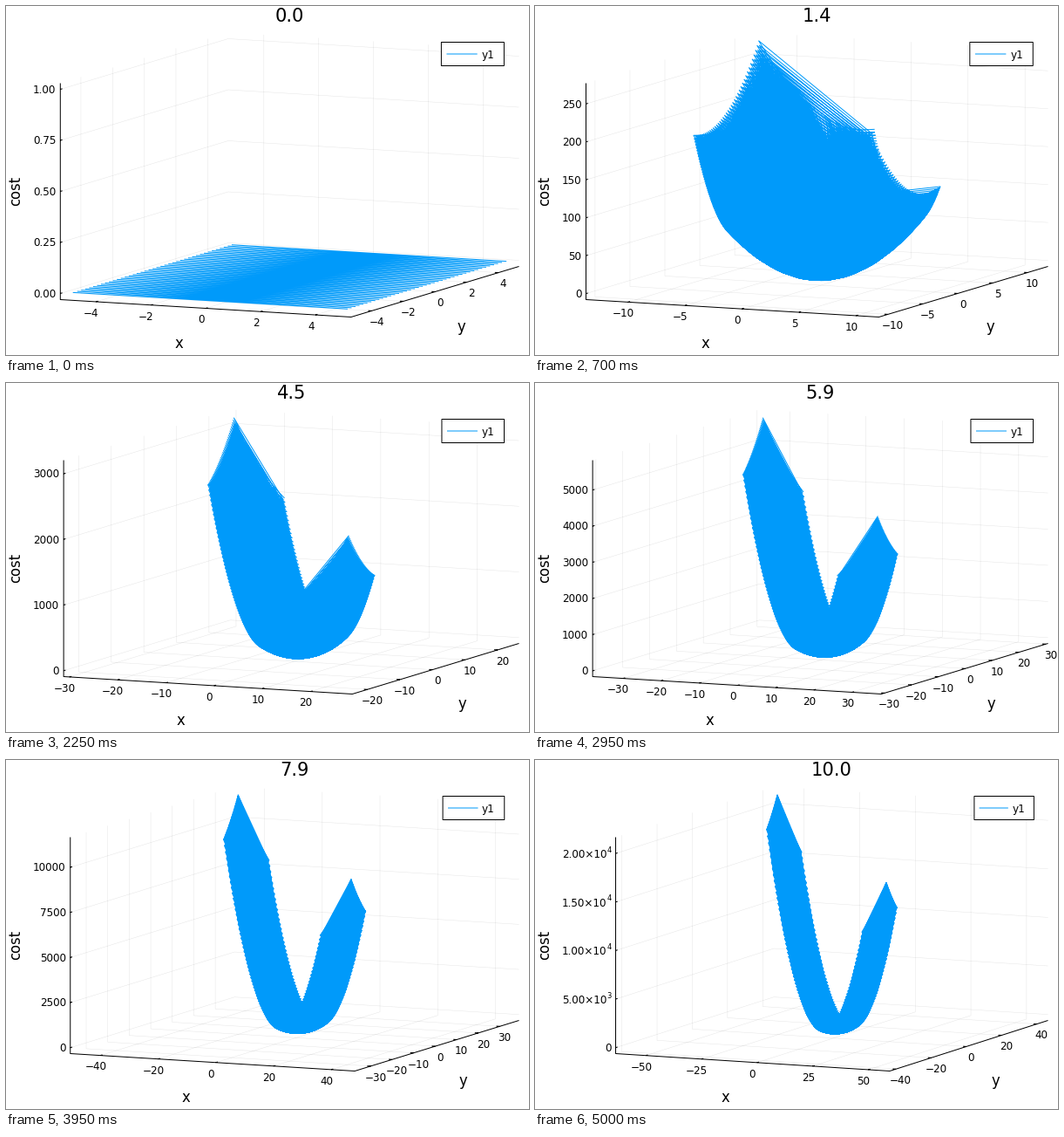
A matplotlib script that plays this animation: 600 px wide and 400 px high, repeating every 5.05 s.

```python
import math

import matplotlib as mpl
import matplotlib.pyplot as plt
import numpy as np
from matplotlib.animation import FuncAnimation

mpl.rcParams["font.family"] = "DejaVu Sans"
mpl.rcParams["agg.path.chunksize"] = 5000

PX = 0.72                     # points per pixel at 100 dpi
BLUE = "#009AFA"
RIGHT, BASE = 588.5, 336.5    # right end and left-corner height of the axes box
FRAMES, DT, SUB = 101, 0.1, 20
A, B = 0.01, -0.05            # growth rates of x and y

fig = plt.figure(figsize=(6, 4), dpi=100, facecolor="white")
ax = fig.add_axes([0, 0, 1, 1])


# Dynamics: x' = A x - w, y' = B y + w, w = u + sin t,
# cost = integral of x^2 + y^2 + w^2.

def basis(rate, sign, t):
    """Coefficients of (start value, u, 1) in the state at time t."""
    e = np.exp(rate * t)
    forced = (e - np.cos(t) - rate * np.sin(t)) / (1 + rate ** 2)
    return np.array([e, sign * (e - 1) / rate, sign * forced])


def gram(v, dt):
    """Running integral of the outer product v v^T."""
    p = v[:, None] * v[None]
    g = np.zeros_like(p)
    g[..., 1:] = np.cumsum((p[..., 1:] + p[..., :-1]) * dt / 2, axis=-1)
    return g


time = np.arange((FRAMES - 1) * SUB + 1) * DT / SUB
VX, VY = basis(A, -1, time), basis(B, 1, time)
VW = np.array([0 * time, 1 + 0 * time, np.sin(time)])
GX, GY, GW = (gram(v, DT / SUB) for v in (VX, VY, VW))

U = np.linspace(-5, 5, 101)[:, None, None]
Y0 = np.linspace(-5, 5, 41)[None, :, None]
X0 = np.linspace(-5, 5, 9)[None, None, :]


def quad(g, a, u):
    return (g[0, 0] * a * a + g[1, 1] * u * u + g[2, 2]
            + 2 * (g[0, 1] * a * u + g[0, 2] * a + g[1, 2] * u))


def states(i):
    k = i * SUB
    u = U if i else U[:1]     # all sheets coincide at the start
    x = VX[0, k] * X0 + VX[1, k] * u + VX[2, k]
    y = VY[0, k] * Y0 + VY[1, k] * u + VY[2, k]
    z = (quad(GX[..., k], X0, u) + quad(GY[..., k], Y0, u)
         + quad(GW[..., k], 0, u))
    return np.broadcast_arrays(x, y, z)


# Axis limits, ticks and labels

def limits(v):
    lo, hi = float(v.min()), float(v.max())
    if hi - lo < 1e-12:
        hi = lo + 1
    pad = 0.03 * (hi - lo)
    return lo - pad, hi + pad


def nice_ticks(lo, hi):
    span = hi - lo
    top = math.ceil(math.log10(span))
    best, ticks = -1, []
    for z in (top, top - 1, top - 2):
        for q, nice in ((5, .9), (3, .2), (2.5, .5), (2, .7), (1, 1)):
            step = q * 10.0 ** z
            first, last = math.ceil(lo / step - 1e-9), math.floor(hi / step + 1e-9)
            n = last - first + 1
            if not 4 <= n <= 8:
                continue
            score = ((1 - abs(n - 5) / 5) / 4 + nice / 4
                     + 0.5 * span / ((n - 1) * step))
            if score > best + 1e-9:
                best = score
                ticks = [j * step for j in range(first, last + 1)]
    return ticks


def decimals(values):
    d = 0
    while d < 6 and any(abs(round(v, d) - v) > 1e-7 for v in values):
        d += 1
    return d


def labels(ticks):
    """Pairs of label text and exponent."""
    if ticks[-1] - ticks[0] > 10000.5:
        exps = [math.floor(math.log10(abs(v)) + 1e-9) if v else 0 for v in ticks]
        mant = [v / 10 ** e for v, e in zip(ticks, exps)]
        d = decimals(mant) + 1
        return [(f"{m:.{d}f}×10", str(e)) if m else ("0", "")
                for m, e in zip(mant, exps)]
    d = decimals(ticks)
    return [(f"{v + 0.0:.{d}f}".replace("-", "−"), "") for v in ticks]


EXP = 4.9                     # width of an exponent digit


def width(label):
    em = {".": .318, "×": .838, "−": .838}
    body, exp = label
    return 12 * sum(em.get(c, .636) for c in body) + EXP * len(exp)


# Drawing helpers

def text(x, y, s, size=12, ha="center"):
    ax.text(x, y + 0.365 * size, s, fontsize=size * PX, ha=ha, va="baseline")


def strokes(paths, color="black", lw=1.0, alpha=1.0):
    xs, ys = [], []
    for path in paths:
        for x, y in path:
            xs.append(x)
            ys.append(y)
        xs.append(np.nan)
        ys.append(np.nan)
    ax.plot(xs, ys, color=color, lw=lw * PX, alpha=alpha, solid_capstyle="butt")


def legend(w):
    right = RIGHT - 0.0325 * w
    left = right - 10.6 - 0.1167 * w
    ax.add_patch(plt.Rectangle((left, 41.5), right - left, 27, fc="white",
                               ec="black", lw=PX, zorder=4, snap=False))
    ax.plot([left + 0.0125 * w, left + 0.0775 * w], [55, 55],
            color=BLUE, lw=PX, zorder=5, snap=False)
    ax.text(left + 0.0875 * w, 59.8, "y1", fontsize=12 * PX, zorder=5)


def draw(i):
    ax.clear()
    ax.set_xlim(0, 600)
    ax.set_ylim(400, 0)
    ax.axis("off")

    x, y, z = states(i)
    lims = [limits(v) for v in (x, y, z)]
    ticks = [nice_ticks(*lim) for lim in lims]
    names = [labels(t) for t in ticks]
    left = 35.6 + max(width(n) for n in names[2])
    w = RIGHT - left

    def project(fx, fy, fz):
        return (left + w * (0.634 * fx + 0.366 * fy),
                BASE + 20 * fx - 58 * fy - 248 * fz)

    def frac(v, axis):
        lo, hi = lims[axis]
        return (v - lo) / (hi - lo)

    fx, fy, fz = ([frac(v, k) for v in ticks[k]] for k in range(3))
    grid = [[(f, 0, 0), (f, 1, 0), (f, 1, 1)] for f in fx]
    grid += [[(1, f, 0), (0, f, 0), (0, f, 1)] for f in fy]
    grid += [[(0, 0, f), (0, 1, f), (1, 1, f)] for f in fz]
    strokes([[project(*p) for p in g] for g in grid], lw=0.5, alpha=0.1)

    edges = [[(0, 0, 1), (0, 0, 0), (1, 0, 0)], [(1, 0, 0), (1, 1, 0)]]
    edges += [[(f, 0, 0), (f, 0.012, 0)] for f in fx]
    edges += [[(1, f, 0), (0.988, f, 0)] for f in fy]
    edges += [[(0, 0, f), (0, 0.012, f)] for f in fz]
    strokes([[project(*p) for p in e] for e in edges])

    for f, (s, _) in zip(fx, names[0]):
        px, py = project(f, 0, 0)
        text(px - 5.3, py + 12.5, s)
    for f, (s, _) in zip(fy, names[1]):
        px, py = project(1, f, 0)
        text(px + 5.5, py + 12.5, s)
    for f, (s, e) in zip(fz, names[2]):
        px, py = project(0, 0, f)
        drop = 0.7 if e else 0
        text(px - 5 - EXP * len(e), py + drop, s, ha="right")
        text(px - 5, py - 4.5, e, 8.4, ha="right")

    px, py = project(0.5, 0, 0)
    text(px - 31, py + 39.3, "x", 16.5)
    px, py = project(1, 0.5, 0)
    text(px + 30.5, py + 39.3, "y", 16.5)
    ax.text(20.5, 212, "cost", fontsize=16.5 * PX, rotation=90,
            ha="right", va="center", rotation_mode="default")
    text((left + RIGHT) / 2, 10.2, f"{i * DT:.1f}", 21)

    sx, sy = project(frac(x, 0), frac(y, 1), frac(z, 2))
    ax.plot(sx.ravel(), sy.ravel(), color=BLUE, lw=PX, solid_joinstyle="bevel")
    legend(w)
    return []


anim = FuncAnimation(fig, draw, frames=FRAMES, interval=50, repeat=True,
                     repeat_delay=0, blit=False)
plt.show()
```
